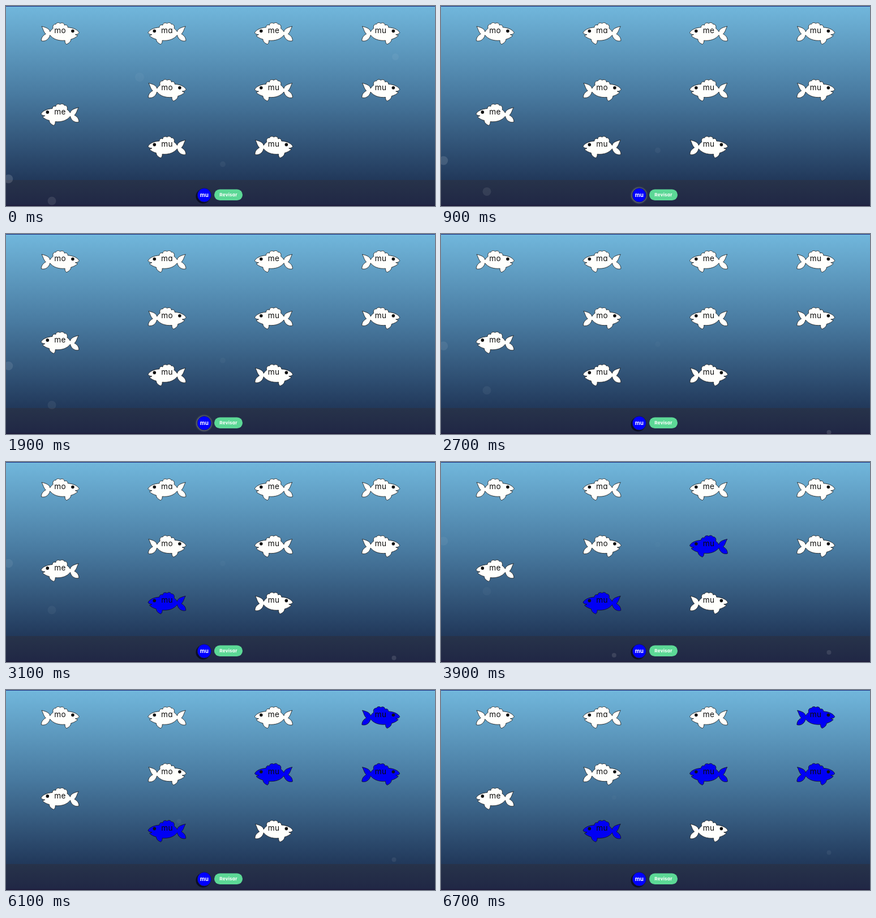
Recreate the animation shown at these times as an HTML page. Size 758 px wide and 354 px high, loop 8000 ms.

```html
<!DOCTYPE html>
<html lang="es">
<head>
<meta charset="utf-8">
<style>
  html, body { margin: 0; width: 100%; height: 100%; overflow: hidden; background: #20264a; }
  svg { display: block; width: 758px; height: 354px; }
  text {
    font: 13.6px Inter, "Open Sans", sans-serif;
    font-feature-settings: "cv11";
    letter-spacing: .4px;
    text-anchor: middle;
    fill: #0b0b0b;
  }
  .bold { font-weight: 700; fill: #fff; letter-spacing: .2px; }
</style>
</head>
<body>
<svg viewBox="0 0 758 354">
  <defs>
    <linearGradient id="sea" x2="0" y2="1">
      <stop offset="0" stop-color="#71b7dc"/>
      <stop offset=".5" stop-color="#497ba1"/>
      <stop offset="1" stop-color="#21385a"/>
    </linearGradient>
    <linearGradient id="floor" x2="0" y2="1">
      <stop offset="0" stop-color="#27334a"/>
      <stop offset="1" stop-color="#202745"/>
    </linearGradient>
    <filter id="soft" x="-50%" y="-50%" width="200%" height="200%">
      <feGaussianBlur stdDeviation="1.6"/>
    </filter>
    <g id="body">
      <path stroke="#151515" stroke-width=".8" stroke-linejoin="round" d="M0 18.5C1.5 14 9 9.5 20 8.8
        C20 5 23 3.5 26 5C26 1 31 -.3 33.5 2C36 -.5 40 .3 41 3.2C44.5 2.5 47.5 6 46 10.5
        C48.5 12.3 50 14.3 51.5 16.5C52.5 11.5 57 9.2 66.3 7C63.5 11 63.5 16 59 20.5
        C62.5 22.5 67 26 66.8 32.5C61 34.5 53.5 31 51.5 22.5C46 29.5 37 33 25 32
        C25.5 34.5 24.5 37 22.5 38.8C18 37 14.5 34 14.5 30C9 28.5 5 26 2.5 23.5
        L7 21.5C4 21.5 1 20.5 0 18.5Z"/>
      <circle cx="11.3" cy="15.2" r="2.8" fill="#111"/>
    </g>
  </defs>
  <rect width="758" height="309" fill="url(#sea)"/>
  <rect y="308" width="758" height="46" fill="url(#floor)"/>
  <rect width="758" height="1" fill="#1c2a80"/>
  <rect y="352.5" width="758" height="1.5" fill="#1d1838"/>
  <g id="bubbles" fill="#fff"></g>
  <g id="school"></g>
  <circle id="shade" cx="348.2" cy="336.7" r="12.8" fill="#0b0e24"/>
  <circle id="glow" cx="350" cy="335" r="13.5" fill="#b3b8a8" filter="url(#soft)"/>
  <circle cx="350.3" cy="334.8" r="12.2" fill="#00f" stroke="#15184a" stroke-width=".8"/>
  <text class="bold" x="350.4" y="338.2" style="font-size:9.8px">mu</text>
  <rect x="368" y="324.5" width="50" height="19.6" rx="9.8" fill="#5cd896"/>
  <text class="bold" x="393" y="337.2" style="font-size:8.1px">Revisar</text>
</svg>
<script>
const $ = id => document.getElementById(id);

// x, y, syllable, faces right, second it is picked
const fish = [
  [62, 29, 'mo', 1], [251, 29, 'ma', 0], [439.5, 29, 'me', 0], [628.5, 29, 'mu', 1, 5.1],
  [251, 129.5, 'mo', 1], [439.5, 129.5, 'mu', 0, 3.9], [628.5, 129.5, 'mu', 1, 6],
  [62, 172.7, 'me', 0], [251, 230.2, 'mu', 0, 3], [439.5, 230.2, 'mu', 1]
];

// x, radius, y at start, speed, acceleration, start, opacity, fade end
const bubbles = [
  [4.5, 7.8, 306, 34, 2.2, 0, .15, 5.8],
  [81, 7.5, 345, 15, 3.8, 0, .1, 5.8],
  [383, 5, 280, 25, 2.4, 0, .05, 5.5],
  [236, 8, 126, 42, 2, 0, .04, 1.1],
  [688, 6, 90, 42, 2, 0, .05, .8],
  [685.5, 4, 351, 9.8, 1.5, 2.7, .18, 10],
  [305.8, 4, 342, 34, 7.2, 3.9, .25, 7.4]
];

$('school').innerHTML = fish.map(([x, y, word, right]) =>
  `<g transform="translate(${x} ${y})">
    <use href="#body" ${right ? 'transform="matrix(-1 0 0 1 67.2 0)"' : ''}/>
    <text x="33.6" y="19">${word}</text>
  </g>`).join('');
$('bubbles').innerHTML = bubbles.map(([x, r]) => `<circle cx="${x}" r="${r}"/>`).join('');

const bodies = document.querySelectorAll('#school use');
const dots = $('bubbles').children;

function draw(now) {
  const t = Math.floor(now % 8000 / 100) / 10;
  fish.forEach((f, i) => bodies[i].setAttribute('fill', t >= f[4] ? '#0000f5' : '#fffffc'));
  bubbles.forEach(([, , y, speed, accel, start, alpha, end], i) => {
    const u = t - start;
    dots[i].setAttribute('cy', y - speed * u - accel * u * u);
    dots[i].setAttribute('opacity', Math.max(0, alpha * (1 - t / end)));
  });
  const hover = t >= .5 && t < 2.7;
  $('glow').setAttribute('opacity', hover ? .6 : 0);
  $('shade').setAttribute('opacity', hover ? 0 : 1);
}

const begin = performance.now();
(function loop() {
  draw(performance.now() - begin);
  requestAnimationFrame(loop);
})();
</script>
</body>
</html>
```
